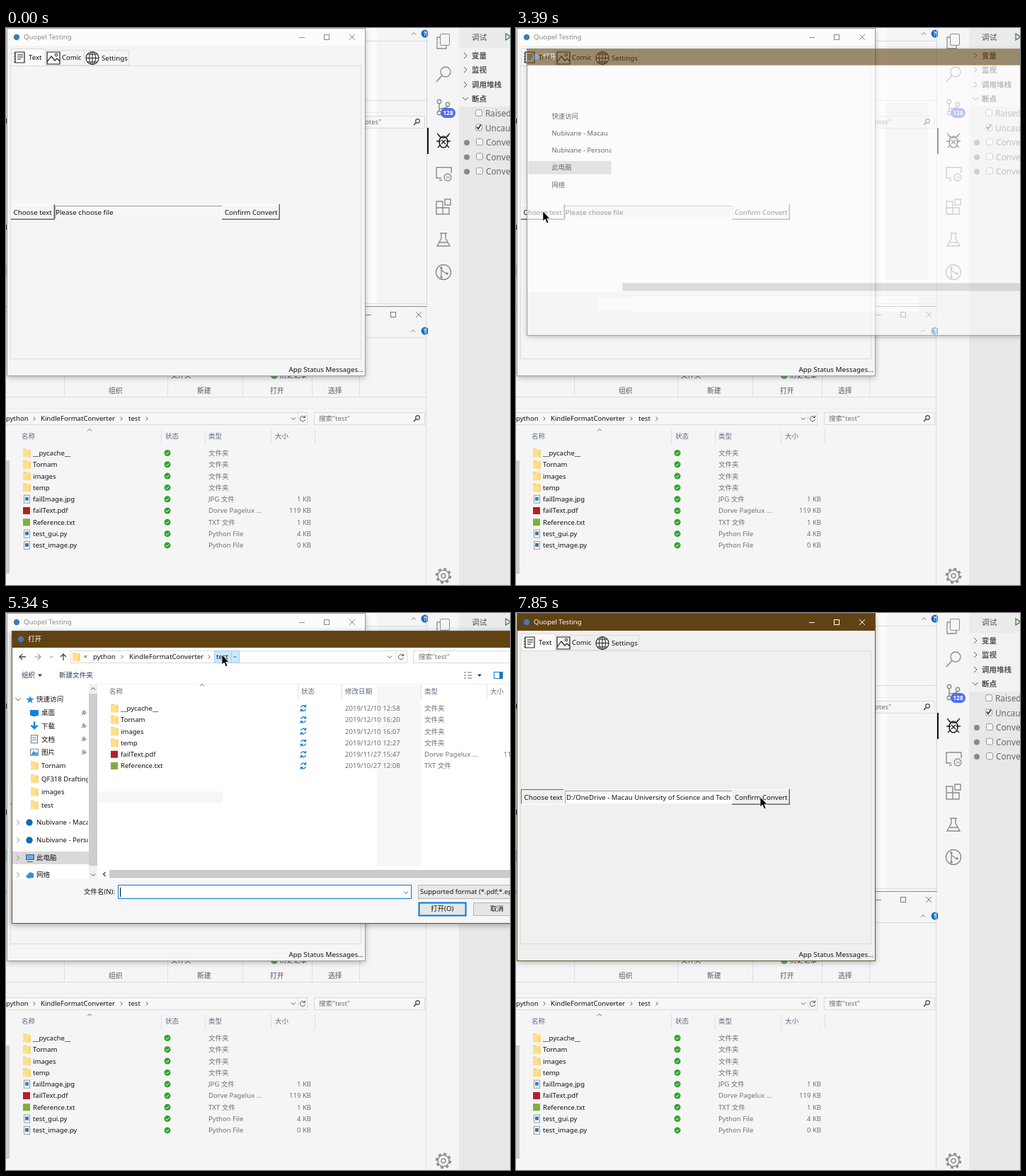
Animation, 712 px wide and 787 px high, one loop 8 s. Source, as an HTML page:

```html
<!DOCTYPE html>
<html lang="zh-CN">
<head>
<meta charset="utf-8">
<title>File converter demo</title>
<style>
html, body { margin: 0; width: 100%; height: 100%; overflow: hidden; background: #f5f5f5; }
svg { display: block; width: 100vw; height: 100vh; }
text { font-family: "Noto Sans", "Noto Sans CJK SC", "Noto Sans CJK", sans-serif; white-space: pre; }
.shadow { filter: drop-shadow(0 2px 4px #0005); }
</style>
</head>
<body>
<svg id="stage" viewBox="0 0 712 787"></svg>
<script>
const LOOP = 8000;
const BROWN = '#614213', GREY = '#707070', BLUE = '#0078d7';

// Drawing helpers; text is placed by its left edge and vertical middle.
const rect = (x, y, w, h, fill = 'none', stroke, extra = '') => stroke
  ? `<rect x="${x + .5}" y="${y + .5}" width="${w - 1}" height="${h - 1}" fill="${fill}" stroke="${stroke}" ${extra}/>`
  : `<rect x="${x}" y="${y}" width="${w}" height="${h}" fill="${fill}" ${extra}/>`;
const text = (x, y, s, fill = '#111', size = 9.55, extra = '') =>
  `<text x="${x}" y="${y + size * .365}" font-size="${size}" fill="${fill}" ${extra}>${s}</text>`;
const path = (d, stroke = GREY, w = 1, fill = 'none') =>
  `<path d="${d}" stroke="${stroke}" stroke-width="${w}" fill="${fill}"/>`;
const circle = (x, y, r, fill = 'none', stroke = 'none', w = 1, extra = '') =>
  `<circle cx="${x}" cy="${y}" r="${r}" fill="${fill}" stroke="${stroke}" stroke-width="${w}" ${extra}/>`;
const group = (id, body, extra = '') => `<g id="${id}" ${extra}>${body}</g>`;
const hline = (x, y, w, c = '#dadada') => rect(x, y, w, 1, c);
const vline = (x, y, h, c = '#e0e0e0') => rect(x, y, 1, h, c);

const down = (x, y, c, r = 3) => path(`M${x - r} ${y - r / 2}l${r} ${r} ${r} ${-r}`, c);
const up = (x, y, c, r = 3) => path(`M${x - r} ${y + r / 2}l${r} ${-r} ${r} ${r}`, c);
const right = (x, y, c = '#555', r = 2.5) => path(`M${x - r / 2} ${y - r}l${r} ${r} ${-r} ${r}`, c);
const left = (x, y, c = '#444', r = 3) => path(`M${x + r / 2} ${y - r}l${-r} ${r} ${r} ${r}`, c, 1.3);
const drop = (x, y) => path(`M${x - 3} ${y - 1.5}h6l-3 3.5z`, 'none', 0, '#1f3a5f');
const lens = (x, y) => circle(x + 1.5, y - 1.5, 2.8, 'none', '#444', 1.2) + path(`M${x - .5} ${y + .5}l-3.5 3.5`, '#444', 1.6);
const refresh = (x, y) => path(`M${x + 3} ${y - 2}a3.6 3.6 0 1 0 .6 3M${x + 3.4} ${y - 4.5}v3h-3`, '#555');
const help = y => circle(592, y, 5.5, '#1170c8') + text(589.7, y, '?', '#fff', 8.5, 'font-weight="700"');
const folder = (x, y) => rect(x - 5, y - 6, 5, 3, '#f5c84c') + rect(x - 5, y - 5, 10.5, 11, '#ffe08a') + rect(x + 3.5, y - 4, 2, 10, '#f8d169');
const page = (x, y, mark) => rect(x - 4, y - 6, 9, 12, '#fff', '#9a9a9a') + rect(x - 2, y - 3, 5, 5, mark);
const fileIcon = (kind, x, y) => ({
  dir: () => folder(x, y),
  jpg: () => page(x, y, '#2e86d0'),
  py: () => page(x, y, '#3a74a8'),
  pdf: () => rect(x - 5, y - 5, 10, 10, '#b3202a'),
  txt: () => rect(x - 5, y - 5, 10, 10, '#7fae3c'),
}[kind]());
const windowButtons = (x, y, c) => hline(x - 39, y, 8, c) + rect(x - 4, y - 4, 8, 8, 'none', c) +
  path(`M${x + 32} ${y - 4}l8 8m0 -8l-8 8`, c);

const READER = 'Dorve Pagelux ...';

function upperExplorer() {
  return rect(508, 0, 16, 392, '#fbfbfb') + hline(508, 18, 86) + hline(508, 102, 86) + up(576, 8, '#777') + help(8) +
    hline(508, 119, 86, '#ececec') + rect(480, 124, 112, 18, '#f7f7f7', '#d9d9d9') +
    text(507, 133, 'otes"', GREY) + lens(580, 133) +
    vline(594, 0, 392, '#d4d4d4') + hline(508, 389, 87, '#ddd') + hline(0, 393, 595, '#8c8c8c') +
    rect(0, 128, 2, 7, '#333') + rect(0, 335, 2, 16, '#a9cfc9') + rect(0, 278, 1, 7, '#333');
}

function lowerExplorer() {
  const files = [
    ['dir', '__pycache__', '文件夹'], ['dir', 'Tornam', '文件夹'], ['dir', 'images', '文件夹'], ['dir', 'temp', '文件夹'],
    ['jpg', 'failImage.jpg', 'JPG 文件', '1 KB'], ['pdf', 'failText.pdf', READER, '119 KB'],
    ['txt', 'Reference.txt', 'TXT 文件', '1 KB'], ['py', 'test_gui.py', 'Python File', '4 KB'],
    ['py', 'test_image.py', 'Python File', '0 KB'],
  ];
  const rows = files.map(([kind, name, type, size = ''], i) => {
    const y = 600.5 + i * 16.3;
    return fileIcon(kind, 29, y) + text(38, y, name) + circle(228, y, 4.5, '#2ca52c') +
      path(`M225.8 ${y}l1.6 1.7 2.8 -3`, '#fff') + text(286, y, type, GREY) +
      text(431, y, size, GREY, 9.55, 'text-anchor="end"');
  }).join('');
  const ribbon = [[145, '组织'], [270, '新建'], [373, '打开'], [455, '选择']].map(([x, s]) => text(x, 512, s, '#555', 9.8)).join('');
  const heads = [[22, '名称'], [225, '状态'], [286, '类型'], [380, '大小']].map(([x, s]) => text(x, 577, s, '#5b6b80')).join('');
  return windowButtons(547, 405, '#777') + up(575, 428, '#777') + help(428) + hline(508, 437, 86) +
    [82, 228, 334, 432, 499].map(x => vline(x, 440, 81)).join('') + ribbon +
    text(233, 491, '文件夹', '#444') + text(387, 491, '历史记录', '#444') + circle(379, 491, 5, '#57a957') +
    hline(0, 521, 594) + hline(0, 537, 594, '#ececec') + rect(-2, 543, 428, 18, '#f7f7f7', '#d9d9d9') + vline(412, 544, 16) +
    text(0, 552, 'python') + right(40, 552) + text(49, 552, 'KindleFormatConverter') + right(163, 552) +
    text(173, 552, 'test') + right(199, 552) + down(406, 552, '#555') + refresh(419, 552) +
    rect(435, 543, 157, 18, '#f7f7f7', '#d9d9d9') + text(442, 552, '搜索"test"', GREY) + lens(580, 552) +
    heads + [219, 281, 374, 436].map(x => vline(x, 567, 21)).join('') + up(118, 568, '#666') +
    rect(0, 611, 5, 160, '#cdcdcd') + rows + vline(593, 394, 393, '#dcdcdc');
}

function editor() {
  const c = '#8c8c8c', k = '#222';
  const sections = [[39, '变量'], [59, '监视'], [80, '调用堆栈']].map(([y, s]) => right(649, y, '#555', 4) + text(658, y, s, '#555', 10.5, 'font-weight="600"')).join('');
  const breaks = ['Raised', 'Uncaught', 'Convert', 'Convert', 'Convert'].map((s, i) => {
    const y = 121 + i * 20.5, x = i < 2 ? 663 : 664;
    return (i < 2 ? '' : circle(651, y, 4, '#898989')) + rect(x, y - 6, 10, 10, '#f4f4f4', '#999', 'rx="2"') +
      (i === 1 ? path(`M665 ${y - 2}l2 3 4 -6`, '#333', 1.6) : '') + text(x + 14, y, s, '#666', 11.8);
  }).join('');
  const legs = path('M611 152l4 3m-7 5h6m-4 9l4 -4m11 -13l-4 3m7 5h-6m4 9l-4 -4M614 155h8', k, 1.5);
  return rect(596, 0, 44, 787, '#f5f5f5') + rect(640, 0, 72, 787, '#e8e8e8') + rect(640, 0, 72, 28, '#ebebeb') +
    rect(640, 28, 72, 83, '#f2f2f2') + text(658, 13, '调试', '#555', 10.7) + path('M706 8v9l7 -4.5z', '#388a34', 1.3) +
    sections + down(649, 100, '#555', 4) + text(658, 100, '断点', '#444', 10.5, 'font-weight="600"') + breaks +
    rect(613, 8, 14, 17, 'none', c, 'rx="1.5"') + path('M613 13h-4v16h13v-4', c, 1.3) +
    circle(621, 62, 7, 'none', c, 1.4) + path('M616 67l-8 9', c, 1.6) +
    circle(612, 104, 2.7, 'none', c, 1.4) + circle(612, 120, 2.7, 'none', c, 1.4) + circle(624, 108, 2.7, 'none', c, 1.4) +
    path('M612 107v10m0 -3q11 0 12 -4', c, 1.4) + rect(614, 113, 21, 14, '#4d6df0', '', 'rx="7"') +
    text(617.3, 120, '128', '#fff', 8.4, 'font-weight="600"') +
    rect(595, 141, 2, 37, '#111') + `<ellipse cx="618" cy="161" rx="6" ry="8" fill="none" stroke="${k}" stroke-width="1.6"/>` + legs +
    path('M609 149l4 4m14 -4l-4 4M615 158l6 6m0 -6l-6 6', k, 1.4) +
    path('M615 212h-7v-15h21v8M612 215h4', c, 1.4) + circle(624, 211, 5, '#f5f5f5', c, 1.3) + path('M622 209l2 2-2 2m5 -4l-2 2 2 2', c) +
    path('M608 245h9v18h-9zM608 254h18v9h-18zM620 242h8v8h-8z', c, 1.4) +
    path('M613 290h10m-8 0v7l-6 11h18l-6 -11v-7M612 303h12', c, 1.4) +
    circle(618, 345, 10.5, 'none', c, 1.4) + path('M615 339v13m0 -10l7 5', c, 1.4) +
    circle(615, 339, 1.8, c) + circle(615, 352, 1.8, c) + circle(623, 347, 1.8, c) +
    circle(618, 774, 8, 'none', c, 1.5) + circle(618, 774, 9.8, 'none', c, 2.8, 'stroke-dasharray="3.85 3.85"') + circle(618, 774, 3, 'none', c, 1.4);
}

const bevel = (x, y, w, h, sunken) => {
  const [a, b] = sunken ? ['#696969', '#fff'] : ['#fff', '#696969'];
  return rect(x, y, w, 1, a) + rect(x, y, 1, h, a) + rect(x, y + h - 1.5, w, 1.5, b) + rect(x + w - 1.5, y, 1.5, h, b);
};
const chooseButton = sunken => bevel(7, 249, 62, 22, sunken) + text(sunken ? 11.5 : 10.5, 260, 'Choose text', '#111', 9.75);

function titleBar(active) {
  return (active ? rect(2, 1, 505, 24, BROWN) : rect(2, 1, 505, 24, '#fcfcfc')) +
    circle(15, 13, 4.2, '#3f7cb8') + text(25, 13, 'Quopel Testing', active ? '#fff' : '#8a8a8a') +
    windowButtons(453, 13, active ? '#fff' : '#8a8a8a') +
    rect(1, 0, 507, 492, 'none', active ? '#6d5530' : '#9c9c9c');
}

function appWindow() {
  const k = '#222';
  const tabs = rect(7, 29, 49, 25, '#fafafa', '#dcdcdc') + rect(55, 31, 56, 22, 'none', '#dcdcdc') + rect(110, 31, 64, 22, 'none', '#dcdcdc') +
    path('M13 34h13v15h-13zM11 36h2m-2 4h2m-2 4h2m-2 4h2M16 38h8m-8 3h8m-8 3h5', k, 1.2) +
    path('M58 34h18v17h-18zM58 48l6 -8 5 6 3 -3 4 4', k, 1.2) + circle(71, 38, 1.8, 'none', k) +
    circle(122, 42.5, 9, 'none', k, 1.1) + `<ellipse cx="122" cy="42.5" rx="4.5" ry="9" fill="none" stroke="${k}"/>` +
    path('M113 42.5h18M122 33.5v18M115 37h14m-14 11h14', k) +
    text(32, 41, 'Text', '#111', 9.7) + text(79, 42, 'Comic', '#111', 9.5) + text(135, 42, 'Settings', '#111', 9.7);
  return rect(2, 1, 505, 490, '#f5f5f5', '', 'class="shadow" id="appBody"') +
    group('titleIdle', titleBar(false)) + group('titleActive', titleBar(true)) +
    rect(6, 53, 496, 415, 'none', '#dcdcdc') + tabs +
    rect(69, 251, 236, 18, '#f7f7f7', '', 'id="entry"') + hline(69, 251, 236, '#9a9a9a') + vline(69, 251, 18, '#9a9a9a') +
    group('raised', chooseButton(false)) + group('sunken', chooseButton(true)) +
    bevel(305, 249, 82, 22, false) + text(309, 260, 'Confirm Convert', '#111', 9.6) +
    group('prompt', text(70, 260, 'Please choose file', '#111', 9.8)) +
    group('chosen', text(71, 260, 'D:/OneDrive - Macau University of Science and Technology', '#111', 9.6), 'clip-path="url(#entryClip)"') +
    text(505, 482, 'App Status Messages...', '#111', 9.8, 'text-anchor="end"');
}

const CLOUD_A = 'Nubivane - Macau', CLOUD_B = 'Nubivane - Personal';

function sidebar() {
  const pinned = ['桌面', '下载', '文档', '图片'].map((s, i) => {
    const y = 141 + i * 18.6;
    const icon = [
      () => rect(34, y - 4, 12, 8, '#1683d8') + rect(37, y + 4, 6, 1, '#1683d8'),
      () => path(`M40 ${y - 6}v9m-4.5 -4l4.5 4.5 4.5 -4.5`, '#1683d8', 2.4),
      () => rect(35, y - 6, 10, 12, '#fff', '#777') + path(`M37 ${y - 2}h6m-6 3h6`, '#2e86d0'),
      () => rect(34, y - 5, 12, 10, '#fff', '#888') + path(`M35 ${y + 4}l4 -6 3 3 2 -2 1 5z`, 'none', 0, '#3a9bd8'),
    ][i]();
    return icon + text(50, y, s) + path(`M107 ${y + 3}l3 -3m-2 -2l4 4m-2 -5l3 3 -2 2 -3 -3z`, '#8a8a8a', 1.1);
  }).join('');
  const folders = ['Tornam', 'QF318 Drafting', 'images', 'test'].map((s, i) => folder(40, 215.5 + i * 18.6) + text(50, 215.5 + i * 18.6, s)).join('');
  return rect(9, 100, 121, 276, '#fff') + rect(9, 337, 108, 18, '#d9d9d9') +
    path('M34 117l1.5 3.6 4 .3 -3 2.6 1 4 -3.5 -2.2 -3.5 2.2 1 -4 -3 -2.6 4 -.3z', 'none', 0, '#2f8ee0') +
    group('nav', text(43, 122, '快速访问') + pinned + folders + circle(33, 296, 4.7, '#0f6cbd') + text(43, 296, CLOUD_A) +
      circle(33, 321, 4.7, '#0f6cbd') + text(43, 321, CLOUD_B), 'clip-path="url(#navClip)"') +
    rect(28, 341, 12, 8, '#5fb3ea', '#557') + hline(30, 351, 8, '#557') + text(43, 346, '此电脑') +
    path('M28 372l6 -6 5 2v6l-8 1z', 'none', 0, '#3c8fcf') + text(43, 370, '网络') +
    rect(117, 100, 12, 276, '#f0f0f0') + rect(117, 114, 12, 243, '#cdcdcd') + up(123, 107, '#444') + down(123, 370, '#444') +
    group('arrows', down(17, 122, '#555', 3.5) + [296, 321, 346, 370].map(y => right(17, y, '#888', 3.5)).join(''));
}

function toolbar() {
  return path('M28 62h-9m4 -4l-4 4 4 4', '#444', 1.3) + path('M40 62h9m-4 -4l4 4 -4 4', '#999', 1.2) + down(64, 62, '#888', 2) +
    path('M81 67v-9m-4 4l4 -4 4 4', '#444', 1.3) + rect(91, 53, 476, 18, '#fff', '#d9d9d9') + folder(99, 62) +
    text(110, 61, '«', '#444') + text(123, 61.5, 'python') + right(164, 62) + text(174, 61.5, 'KindleFormatConverter') + right(287, 62) +
    group('crumbHover', rect(294, 53, 25, 18, '#cce8ff', '#99d1ff') + rect(318, 53, 12, 18, '#cce8ff', '#99d1ff')) +
    text(297, 61.5, 'test') + group('crumbRight', right(323, 62)) + group('crumbDown', down(323.5, 62, '#444', 2)) +
    down(542, 62, '#555') + vline(550, 54, 16) + refresh(558, 62) + rect(575, 53, 160, 18, '#fff', '#d9d9d9') +
    text(583, 62, '搜索"test"', GREY) + text(22, 88, '组织', '#1f3a5f') + drop(48, 88) + text(75, 88, '新建文件夹', '#1f3a5f') +
    path('M647 84h3m-3 4h3m-3 4h3m2 -8h6m-6 4h6m-6 4h6', '#667') + drop(669, 88) + hline(9, 100, 723, '#eee') +
    rect(689, 83, 13, 10, '#fff', '#1e78c2') + rect(697, 83, 5, 10, '#1e78c2');
}

function fileList() {
  const files = [
    ['dir', '__pycache__', '2019/12/10 12:58', '文件夹'], ['dir', 'Tornam', '2019/12/10 16:20', '文件夹'],
    ['dir', 'images', '2019/12/10 16:07', '文件夹'], ['dir', 'temp', '2019/12/10 12:27', '文件夹'],
    ['pdf', 'failText.pdf', '2019/11/27 15:47', READER], ['txt', 'Reference.txt', '2019/10/27 12:08', 'TXT 文件'],
  ];
  const rows = files.map(([kind, name, date, type], i) => {
    const y = 134.5 + i * 16.3;
    return fileIcon(kind, 153, y) + text(162, y, name) +
      path(`M416.5 ${y - 1}a3.7 3.7 0 0 1 6.5 -1.5m.5 -2.5v3h-3M423.5 ${y + 1}a3.7 3.7 0 0 1 -6.5 1.5m-.5 2.5v-3h3`, '#1a7fc9', 1.3) +
      text(479, y, date, GREY) + text(591, y, type, GREY);
  }).join('');
  const heads = [[146, '名称'], [417, '状态'], [479, '修改日期'], [591, '类型'], [684, '大小']].map(([x, s]) => text(x, 111, s, '#5b6b80')).join('');
  return heads + [412, 474, 586, 679].map(x => vline(x, 101, 21)).join('') + up(277, 102, '#666') +
    group('rowSelected', rect(144, 208, 590, 17, '#cce8ff', '#99d1ff')) + rows + text(703, 200, '119 KB', GREY) + left(139, 369);
}

function footer() {
  return text(154, 394, '文件名(N):', '#111', 9.55, 'text-anchor="end"') + rect(158, 384, 415, 20, '#fff', BLUE) + down(565, 395, '#555') +
    group('fileName', text(161, 394, 'Reference.txt')) +
    group('fileMarked', rect(160, 387, 62, 14, BLUE) + text(161, 394, 'Reference.txt', '#fff')) +
    group('caret', vline(161, 388, 13, '#000')) +
    rect(582, 384, 160, 20, '#e8e8e8', '#b5b5b5') + text(585, 394, 'Supported format (*.pdf;*.epub)') +
    rect(583, 409, 67, 19, '#e6e6e6', BLUE, 'stroke-width="2"') + text(600, 418, '打开(O)') +
    rect(660, 409, 67, 19, '#e6e6e6', '#b5b5b5') + text(684, 418, '取消');
}

function dialog() {
  const early = rect(10, 187, 121, 19, '#d6d6d6') +
    [['快速访问', 122], [CLOUD_A, 146.5], [CLOUD_B, 171], ['此电脑', 196], ['网络', 221]].map(([s, y]) => text(44, y, s)).join('');
  return rect(8, 25, 724, 414, '#fff', '', 'class="shadow"') + rect(9, 376, 723, 62, '#f6f6f6') +
    rect(524, 103, 62, 255, '#f7f7f7') + rect(70, 252, 236, 16, '#f7f7f7') +
    rect(8, 25, 724, 24, BROWN) + circle(21, 37, 4.2, '#3f7cb8') + text(31, 37, '打开', '#fff') +
    rect(146, 363, 590, 11.5, '#cbcbcb') + group('early', early, 'clip-path="url(#earlyClip)"') +
    group('earlyField', rect(110, 384, 47, 18, '#fff') + rect(158, 382, 415, 22, '#fff')) +
    group('toolbar', toolbar()) + group('sidebar', sidebar()) + group('fileList', fileList()) + group('footer', footer()) +
    rect(8, 25, 724, 414, 'none', '#6b5430');
}

const clip = (id, x, y, w, h) => `<clipPath id="${id}">${rect(x, y, w, h, '#000')}</clipPath>`;
document.getElementById('stage').innerHTML =
  `<defs>${clip('entryClip', 69, 250, 235, 20)}${clip('navClip', 9, 100, 107, 276)}${clip('earlyClip', 9, 100, 121, 276)}</defs>` +
  rect(0, 0, 712, 787, '#f5f5f5') + upperExplorer() + lowerExplorer() + editor() + group('app', appWindow()) + group('dialog', dialog()) +
  group('cursor', path('M0 0v14l3.2 -3 2.4 5.8 2.4 -1 -2.4 -5.6h4.2z', '#fff', .7, '#000'));

const el = id => document.getElementById(id);
const fade = (id, opacity) => {
  el(id).style.opacity = +opacity;
  el(id).style.display = +opacity ? '' : 'none';
};
const between = (t, a, b) => t >= a && t < b;
// Value of the last [time, value] key that has been reached.
const held = (t, keys) => keys.reduce((value, [at, next]) => t >= at ? next : value, keys[0][1]);

function render(t) {
  const active = between(t, 570, 2810) || t >= 7190;
  fade('titleActive', active);
  fade('titleIdle', !active);
  el('appBody').setAttribute('fill', active ? '#f0f0f0' : '#f5f5f5');
  el('entry').setAttribute('fill', active ? '#fff' : '#f7f7f7');
  const sunken = between(t, 570, 650) || t >= 7570;
  fade('sunken', sunken);
  fade('raised', !sunken);
  fade('prompt', t < 7570);
  fade('chosen', t >= 7570);

  const [opacity, scale] = held(t, [[0, [0, 1]], [3180, [.08, .94]], [3290, [.3, .96]], [3390, [.6, .98]], [3480, [.85, .992]],
    [3570, [.95, .998]], [3650, [1, 1]], [7190, [.6, .985]], [7290, [.2, .965]], [7370, [0, 1]]]);
  fade('dialog', opacity);
  el('dialog').setAttribute('transform', `translate(370 231) scale(${scale}) translate(-370 -231)`);
  fade('toolbar', t >= 3810);
  fade('sidebar', t >= 3890);
  fade('early', t < 3890);
  fade('fileList', t >= 3970);
  fade('footer', t >= 4040);
  fade('earlyField', t < 4040);

  fade('arrows', held(t, [[0, 1], [5530, .9], [5630, .75], [5730, .6], [5890, .4], [5990, .25], [6090, .1], [6190, 0]]));
  fade('crumbHover', held(t, [[0, 0], [5340, 1], [6450, .75], [6550, .4], [6620, .2], [6720, 0]]));
  const hover = between(t, 5340, 6450);
  fade('crumbDown', hover);
  fade('crumbRight', !hover);
  fade('rowSelected', t >= 6450);
  fade('fileName', between(t, 6450, 7100));
  fade('fileMarked', t >= 7100);
  fade('caret', held(t, [[0, 1], [4390, 0], [4880, 1], [5530, 0], [5890, 1], [6450, 0]]));

  const [x, y] = held(t, [[0, [38, 259]], [5240, [215, 118]], [5340, [305, 59]], [6450, [184, 214]], [7100, [615, 412]], [7850, [345, 260]]]);
  fade('cursor', t >= 570);
  el('cursor').setAttribute('transform', `translate(${x} ${y})`);
}

const start = performance.now();
function tick() {
  render((performance.now() - start) % LOOP);
  requestAnimationFrame(tick);
}
tick();
</script>
</body>
</html>
```
